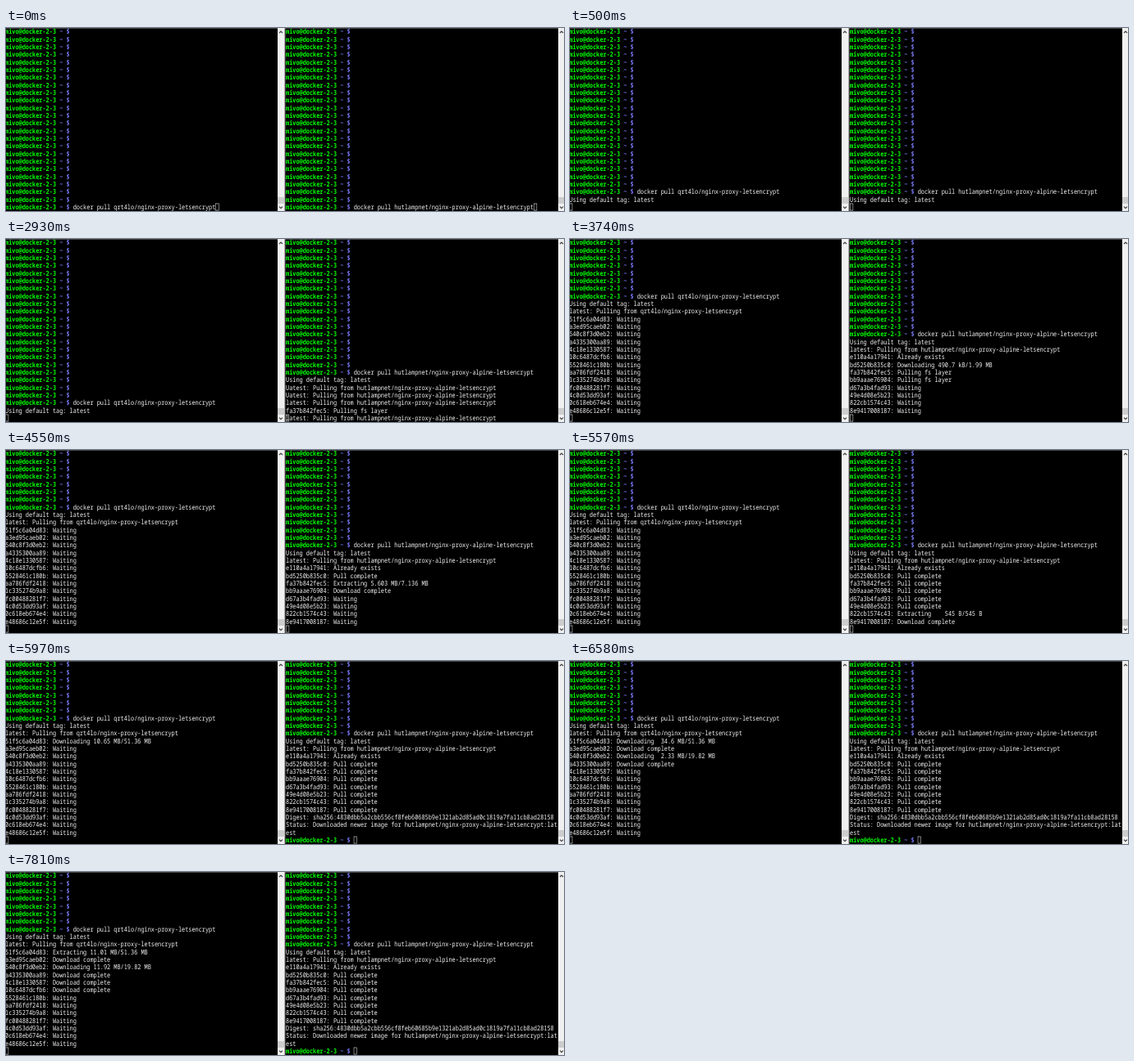
Write an HTML page that moves like this. It is 680x224 px and loops after 8 s.

```html
<!DOCTYPE html>
<html lang="en">
<head>
<meta charset="utf-8">
<title>Two terminals pulling images</title>
<style>
  html, body { margin: 0; width: 100%; height: 100%; overflow: hidden; background: #000; }
  #stage { position: relative; width: 680px; height: 224px; overflow: hidden; background: #000; }
  /* Cells are 8 x 15 units, scaled down to the terminal's narrow grid */
  .term {
    position: absolute; top: 0; margin: 0; width: 640px; height: 360px;
    font: 13.3333px/15px "Noto Sans Mono", "DejaVu Sans Mono", monospace;
    font-variant-ligatures: none; text-rendering: geometricPrecision;
    white-space: pre; color: #f4f4f4;
    transform-origin: 0 0; transform: scale(.5171, .62222);
  }
  .term b { font-weight: 700; color: #0f0; }
  .term u { font-weight: 700; color: #7c7cff; text-decoration: none; }
  .term i { position: absolute; box-sizing: border-box; width: 8px; height: 14px; border: 1.8px solid #e4e4e4; }
  #left { left: -.7px; }
  #right { left: 341px; }
  svg { position: absolute; left: 0; top: 0; }
</style>
</head>
<body>
<div id="stage">
  <pre class="term" id="left"></pre>
  <pre class="term" id="right"></pre>
  <svg width="680" height="224" viewBox="0 0 680 224">
    <defs>
      <g id="bar">
        <rect width="8.8" height="224" fill="#f0f0f0"/>
        <rect y="207" width="8.8" height="8" fill="#cdcdcd"/>
        <path d="M2 6 4 4 6 6M2 218.6 4 220.6 6 218.6" fill="none" stroke="#404040" stroke-width="1.2"/>
      </g>
    </defs>
    <rect width="680" height=".5" fill="#808080"/>
    <use href="#bar" x="331"/>
    <rect x="339.8" width=".7" height="224" fill="#707070"/>
    <use href="#bar" x="673"/>
  </svg>
</div>
<script>
const LOOP = 8000, ROWS = 24;
const PROMPT = '<b>mivo@docker-2-3</b><u> ~ $ </u>';
const DONE = 'Pull complete', GOT = 'Download complete', WAIT = 'Waiting';

const progress = verb => (now, total) => `${verb} ${now.padStart(8)}/${total}`;
const load = progress('Downloading');
const unpack = progress('Extracting');

const big = n => load(n + ' MB', '51.36 MB');
const mid = n => load(n + ' MB', '19.82 MB');
const open = n => unpack(n, '51.36 MB');
const fa = n => unpack(n + ' MB', '7.136 MB');

// Each step: [time, { layer index: new status }]
const panes = [
  {
    el: document.getElementById('left'),
    image: 'qrt4lo/nginx-proxy-letsencrypt',
    ids: ('51f5c6a04d83 a3ed95caeb02 640c8f3d0eb2 a4335300aa89 4c18e1330587 10c6487dcfb6 5528461c180b ' +
      'aa786fdf2418 1c335274b9a8 fc00488281f7 4c0d53dd93af 0c618eb674e4 e48686c12e5f').split(' '),
    steps: [
      [5770, { 0: big('2.666') }],
      [5970, { 0: big('10.65') }],
      [6190, { 0: big('18.63') }],
      [6390, { 0: big('26.62'), 1: GOT, 2: mid('0.41') }],
      [6580, { 0: big('34.6'), 2: mid('2.33'), 3: GOT }],
      [6790, { 0: big('43.12'), 2: mid('4.26') }],
      [6990, { 0: open('557.1 kB'), 2: mid('6.08') }],
      [7210, { 0: open('2.785 MB'), 2: mid('7.71') }],
      [7390, { 0: open('5.571 MB'), 2: mid('9.12'), 4: GOT }],
      [7610, { 0: open('8.356 MB'), 2: mid('10.53'), 5: GOT }],
      [7810, { 0: open('11.01 MB'), 2: mid('11.92') }]
    ]
  },
  {
    el: document.getElementById('right'),
    image: 'hutlampnet/nginx-proxy-alpine-letsencrypt',
    ids: ('e110a4a17941 bd5250b835c0 fa37b842fec5 bb9aaae76904 ' +
      'd67a3b4fad93 49e4d08e5b23 822cb1574c43 8e9417008187').split(' '),
    start: 2930,
    end: 5770,
    steps: [
      [3130, { 0: 'Already exists', 1: 'Pulling fs layer', 2: 'Pulling fs layer', 3: 'Pulling fs layer' }],
      [3740, { 1: load('490.7 kB', '1.99 MB') }],
      [3940, { 1: unpack('32.77 kB', '1.99 MB'), 2: load('1.228 MB', '7.136 MB') }],
      [4140, { 1: unpack('1.99 MB', '1.99 MB'), 2: load('5.161 MB', '7.136 MB'), 3: GOT }],
      [4350, { 1: DONE, 2: fa('1.376') }],
      [4550, { 2: fa('5.603') }],
      [4750, { 2: fa('7.136'), 4: load('65.54 kB', '350.9 kB') }],
      [4950, { 2: DONE, 3: DONE, 4: load('262.1 kB', '350.9 kB'), 5: 'Pulling fs layer' }],
      [5170, { 4: GOT, 5: GOT, 6: GOT }],
      [5370, { 4: unpack('350.9 kB', '350.9 kB') }],
      [5570, { 4: DONE, 5: DONE, 6: unpack('545 B', '545 B'), 7: GOT }],
      [5770, { 6: DONE, 7: DONE }]
    ]
  }
];

const sha = '4830dbb5a2cbb556cf8feb60685b9e1321ab2d85ad0c1819a7fa11cb8ad28158';

function layers(p, t) {
  const status = p.ids.map(() => WAIT);
  for (const [at, change] of p.steps) if (t >= at) Object.assign(status, change);
  return p.ids.map((id, i) => `${id}: ${status[i]}`);
}

// Lines from the command down, plus the cursor column on the last row
function content(p, t) {
  const cmd = 'docker pull ' + p.image;
  const lines = [PROMPT + cmd];
  if (t < 500) return [lines, 20 + cmd.length];
  lines.push('Using default tag: latest');
  const from = `atest: Pulling from ${p.image}`;
  if (t >= 3130) {
    lines.push('l' + from, ...layers(p, t));
  } else if (t >= p.start) {
    lines.push('U' + from, 'U' + from, 'l' + from, p.ids[2] + ': Pulling fs layer', 'l' + from);
    return [lines, 0];
  }
  if (t >= p.end) {
    const note = `Status: Downloaded newer image for ${p.image}:latest`;
    lines.push('Digest: sha256:' + sha, note.slice(0, 80), note.slice(80), PROMPT);
    return [lines, 20];
  }
  lines.push('');
  return [lines, 0];
}

function draw(p, t) {
  const [lines, col] = content(p, t);
  const above = Array(ROWS - lines.length).fill(PROMPT);
  const html = above.concat(lines).join('\n') +
    `<i style="left:${col * 8}px;top:${(ROWS - 1) * 15}px"></i>`;
  if (html !== p.html) p.el.innerHTML = p.html = html;
}

function tick() {
  const t = performance.now() % LOOP;
  for (const p of panes) draw(p, t);
  requestAnimationFrame(tick);
}
tick();
</script>
</body>
</html>
```
